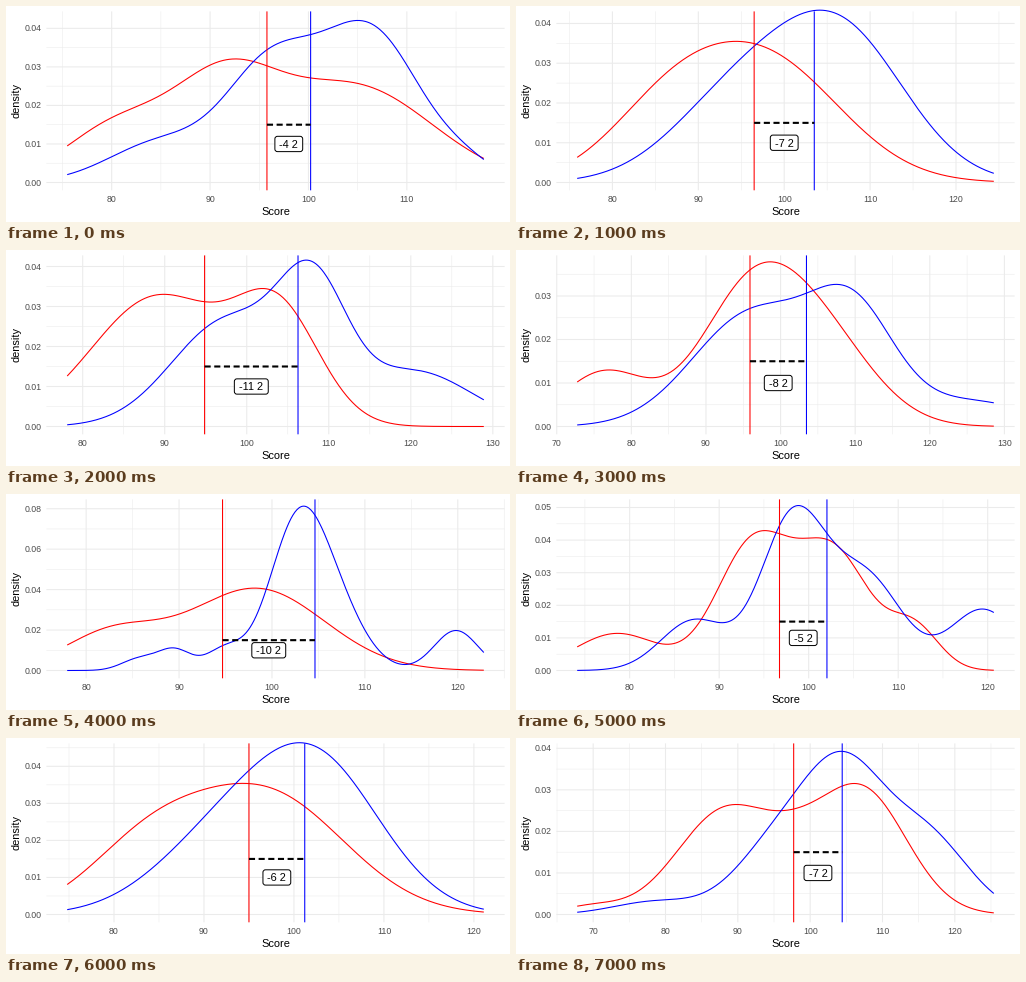
A matplotlib script that plays this animation: 504 by 216 pixels, repeating every 8000 ms.

```python
import matplotlib.pyplot as plt
import numpy as np
from matplotlib.animation import FuncAnimation
from matplotlib.patches import FancyBboxPatch

W, H = 504, 216
LEFT, RIGHT, TOP, BOTTOM = 40.4, 498.6, 5.4, 184.3
X0, X1 = 61.2, 477.8     # ends of the curves
BASE, PEAK = 176.5, 163  # zero line and height of the tallest curve
GRID = "#EBEBEB"

plt.rcParams["font.family"] = "Liberation Sans"
plt.rcParams["path.snap"] = False
fig = plt.figure(figsize=(W / 72, H / 72), dpi=72, facecolor="white")
ax = fig.add_axes([0, 0, 1, 1])
scenes = []


def scene(scores, peak, means, red, blue):
    """Score range, top density, mean scores and the hills of both curves."""
    scenes.append((scores, peak, means, red, blue))


# A hill is a bell curve: centre, height and spread in pixels.
scene((75.48, 117.82), 0.0423, (95.78, 100.22),
      [(110, 55, 52), (217, 92, 52), (348, 96, 78)],
      [(155, 40, 52), (264, 110, 45), (364, 150, 50), (460, 14, 30)])

scene((75.9, 124.4), 0.041, (96.5, 103.5),
      [(150, 60, 60), (250, 120, 75)],
      [(220, 80, 65), (325, 145, 65)])

scene((78.11, 128.9), 0.04075, (94.86, 106.25),
      [(152, 130, 66), (272, 108, 42)],
      [(222, 106, 56), (307, 119, 34), (408, 55, 58)])

scene((72.74, 128.58), 0.03747, (95.9, 103.47),
      [(88, 54, 42), (237, 135, 52), (312, 70, 51)],
      [(237, 113, 60), (337, 105, 42), (455, 25, 60)])

scene((77.96, 122.8), 0.0806, (94.68, 104.63),
      [(105, 36, 48), (250, 82, 68)],
      [(132, 11, 17), (168, 21, 17), (218, 20, 18), (293, 149, 29),
       (335, 42, 28), (450, 40, 22)])

scene((74.14, 120.68), 0.05, (96.74, 102.04),
      [(101, 37, 42), (238, 127, 37), (318, 115, 36), (398, 42, 25)],
      [(178, 50, 33), (277, 151, 32), (350, 92, 36), (467, 61, 33)])

scene((74.8, 121.1), 0.044, (95, 101.2),
      [(140, 60, 60), (260, 120, 78)],
      [(210, 65, 65), (310, 148, 65)])

scene((67.79, 125.39), 0.03923, (97.72, 104.43),
      [(75, 8, 30), (212, 106, 50), (280, 20, 30), (345, 125, 45)],
      [(140, 13, 42), (260, 65, 42), (328, 134, 40), (410, 77, 42)])


def line(x, y, color, width, **style):
    ax.plot(x, y, color=color, lw=width, solid_capstyle="butt",
            dash_capstyle="butt", **style)


def note(x, y, text, size=8.8, color="#4D4D4D", **style):
    style = {"ha": "center", "va": "baseline"} | style
    ax.text(x, y, text, fontsize=size, color=color, **style)


def draw_curve(hills, color):
    x = np.linspace(X0, X1, 420)
    rise = sum(h * np.exp(-((x - c) / s) ** 2 / 2) for c, h, s in hills)
    line(x, BASE - rise, color, 1.07)


def draw_axes(to_x, to_y, step):
    for half in range(10, 30):  # odd halves are minor lines
        x = to_x(5 * half)
        if LEFT - 0.3 <= x <= RIGHT:
            line([x, x], [TOP, BOTTOM], GRID, 0.53 if half % 2 else 1.07)
            if half % 2 == 0:
                note(x, 196, str(5 * half))
    for half in range(12):
        y = to_y(half * step / 2)
        if y >= TOP:
            line([LEFT, RIGHT], [y, y], GRID, 0.53 if half % 2 else 1.07)
            if half % 2 == 0:
                note(35.5, y + 3, f"{half * step / 2:.2f}", ha="right")
    note(269.5, 209, "Score", 11, "black")
    note(10, 95, "density", 11, "black", rotation=90, va="center")


def draw_label(x, y, text):
    w, h = 6.1 * len(text) + 3.4, 15.3
    ax.add_patch(FancyBboxPatch(
        (x - w / 2, y - h / 2), w, h, boxstyle="round,pad=0,rounding_size=2.6",
        fc="white", ec="black", lw=1, zorder=4))
    note(x, y + 4, text, 11, "black", zorder=5)


def update(i):
    (low, high), peak, means, red, blue = scenes[i]

    def to_x(score):
        return X0 + (score - low) / (high - low) * (X1 - X0)

    def to_y(density):
        return BASE - density / peak * PEAK

    ax.clear()
    ax.set(xlim=(0, W), ylim=(H, 0))
    ax.axis("off")
    draw_axes(to_x, to_y, 0.02 if peak > 0.06 else 0.01)
    draw_curve(red, "red")
    draw_curve(blue, "blue")
    ends = [to_x(m) for m in means]
    for x, color in zip(ends, ("red", "blue")):
        line([x, x], [TOP, BOTTOM], color, 1.07)
    y = to_y(0.015)
    line(ends, [y, y], "black", 2.1, ls=(0, (2.9, 1.7)))
    gap = round(means[0] - means[1])
    draw_label(sum(ends) / 2, to_y(0.01), f"{gap} 2")
    return []


anim = FuncAnimation(fig, update, frames=len(scenes), init_func=lambda: [],
                     interval=1000, repeat=True, repeat_delay=0)
plt.show()
```
